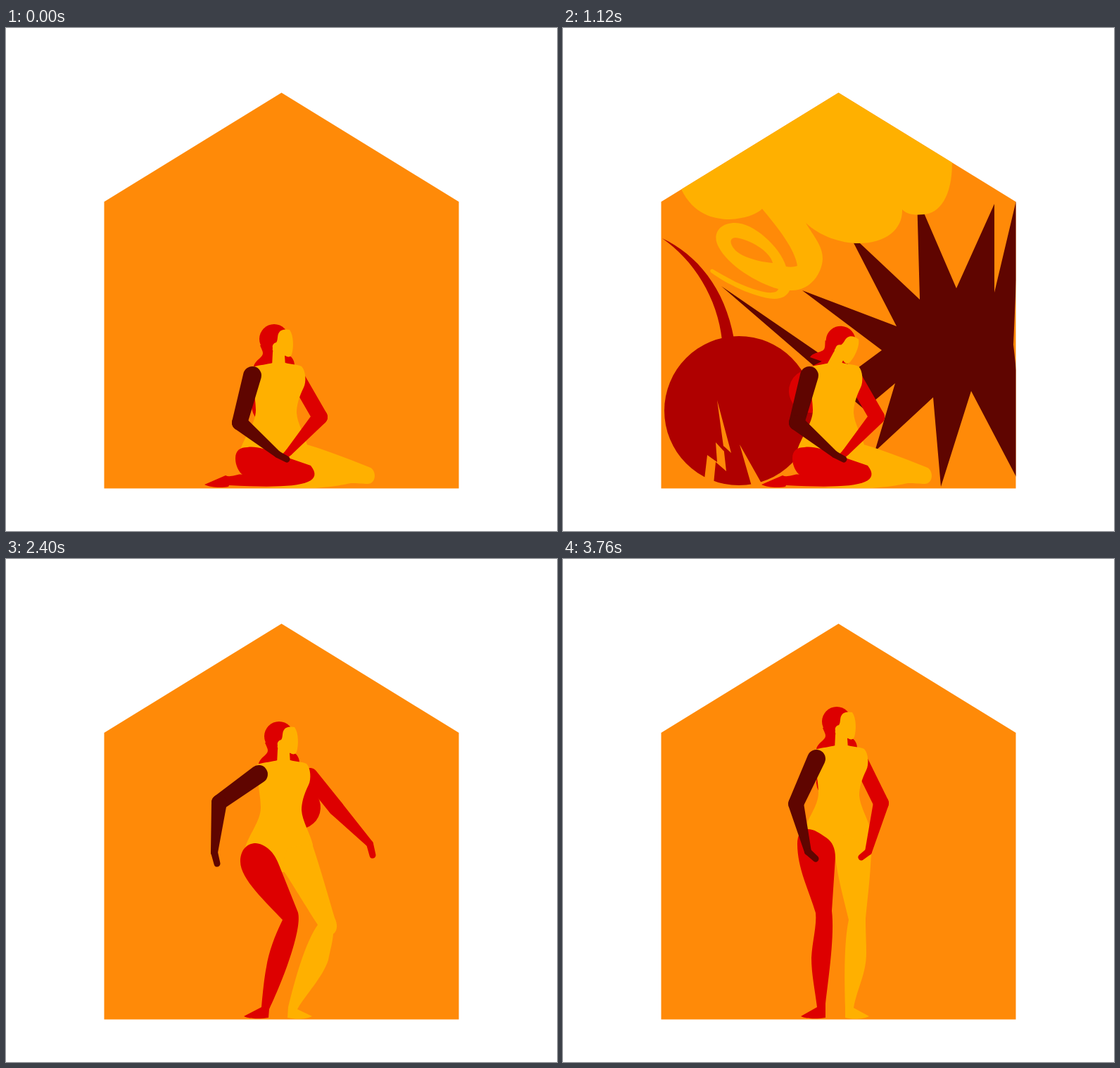
Write an HTML page with a canvas that moves like this. It is 783 px wide and 715 px high and loops after 4.72 s.

```html
<!DOCTYPE html>
<html lang="en">
<head>
<meta charset="utf-8">
<title>House</title>
<style>
  html, body { margin: 0; width: 100%; height: 100%; overflow: hidden; background: #fff; }
  canvas { display: block; }
</style>
</head>
<body>
<canvas id="stage" width="783" height="715"></canvas>
<script>
const ctx = document.getElementById('stage').getContext('2d');
const LOOP = 4720, STEP = 80, LAST = 3760;
const ORANGE = '#ff8a08', YELLOW = '#ffb000', RED = '#dd0000', DARK = '#5f0500', CRIMSON = '#af0000';
const NUMBER = /-?\d+(\.\d+)?/g;

// Smooth interpolation through keys [time, ...values]; slopes vanish at turning points.
function at(keys, t) {
  const last = keys.length - 1;
  if (t <= keys[0][0]) return keys[0].slice(1);
  if (t >= keys[last][0]) return keys[last].slice(1);
  const i = keys.findIndex(k => k[0] > t) - 1;
  const a = keys[i], b = keys[i + 1], span = b[0] - a[0], u = (t - a[0]) / span;
  const rate = (j, c) => (keys[j + 1][c] - keys[j][c]) / (keys[j + 1][0] - keys[j][0]);
  const slope = (j, c) => {
    if (j === 0 || j === last) return 0;
    const p = rate(j - 1, c), q = rate(j, c);
    return p * q <= 0 ? 0 : 2 * p * q / (p + q);
  };
  return a.slice(1).map((v, n) => {
    const c = n + 1, w = 1 - u;
    return v * (1 + 2 * u) * w * w + b[c] * u * u * (3 - 2 * u)
      + span * u * w * (w * slope(i, c) - u * slope(i + 1, c));
  });
}

// Paths with the same commands, blended number by number.
function morph(...keys) {
  const template = keys[0][1];
  const values = keys.map(([t, d]) => [t, ...d.match(NUMBER).map(Number)]);
  return t => {
    const v = at(values, t);
    let i = 0;
    return template.replace(NUMBER, () => v[i++].toFixed(2));
  };
}

function fill(color, d, rule = 'nonzero') {
  ctx.fillStyle = color;
  ctx.fill(new Path2D(d), rule);
}

function capsule(color, x1, y1, r1, x2, y2, r2) {
  const a = Math.atan2(y2 - y1, x2 - x1), d = Math.hypot(x2 - x1, y2 - y1) || 1;
  const o = Math.acos(Math.max(-1, Math.min(1, (r1 - r2) / d)));
  ctx.fillStyle = color;
  ctx.beginPath();
  ctx.arc(x1, y1, r1, a + o, a - o + 2 * Math.PI);
  ctx.arc(x2, y2, r2, a - o, a + o);
  ctx.fill();
}

function disc(color, x, y, r) {
  ctx.fillStyle = color;
  ctx.beginPath();
  ctx.arc(x, y, r, 0, 2 * Math.PI);
  ctx.fill();
}

function group(draw) {
  ctx.save();
  draw();
  ctx.restore();
}

function growFrom(x, y, s) {
  ctx.translate(x, y);
  ctx.scale(s, s);
  ctx.translate(-x, -y);
}

const HOUSE = 'M391.5 92L643.5 247V654.5H139.5V247Z';

// Cloud with its scribble
const cloudShape = morph(
  [640, `M100 -300L168 229L185 230C200 250 225 259 240 258C260 257 275 248 279 232
    C300 260 333 300 338 322C336 332 330 332 320 332C312 300 285 260 255 260C228 260 217 275 222 293
    C228 315 270 345 310 360C306 373 290 375 277 371C255 364 235 355 212 341C208 340 206 344 209 347
    C235 364 270 382 295 383C310 383 318 375 322 362C352 364 371 345 370 322C368 290 345 260 323 226
    C355 262 385 278 410 278C440 278 459 265 460 247C468 258 478 261 488 261C520 260 549 235 551 190L620 -300Z
    M305 330C302 310 280 282 250 279C238 281 244 298 256 306C270 318 290 327 305 330Z`],
  [1120, `M100 -300L160 210L168 229C185 265 215 272 237 272C258 271 275 265 283 257
    C305 283 330 315 333 338C328 340 322 340 317 339C308 310 270 277 245 277C220 277 212 295 221 311
    C235 338 275 362 306 371C304 378 290 377 277 373C255 367 235 356 213 343C209 342 208 346 211 348
    C230 362 270 383 300 385C312 385 319 380 322 373C350 375 368 350 369 328C369 310 357 297 345 277
    C365 296 395 306 420 306C460 306 483 285 482 258C490 266 502 266 512 265C535 264 553 240 553 191L620 -300Z
    M298 334C295 318 265 300 245 298C232 299 240 316 255 323C270 330 285 333 298 334Z`]);
const cloudMove = [[80, 0, 0, 0], [560, 0, 0, .85], [640, 0, 0, 1], [1680, 0, 0, 1], [1920, 50, -62, 1], [2240, 150, -330, 1]];

// Spiky burst
const burstShape = morph(
  [640, `M178 367L390 488L418 455L295 383L441 418L366 287L480 382L483 240L533 376L600 275
    L574 398L640 328L591 453L618 623L544 518L507 654L487 523L413 612L435 505L392 520Z`],
  [1120, `M225 367L407 492L453 458L340 373L474 424L405 290L507 386L503 240L559 370L613 250
    L613 376L650 220L640 450L665 678L580 516L537 652L526 525L443 602L472 505L428 542Z`],
  [1680, `M225 367L407 492L453 458L340 373L474 424L405 290L507 386L503 240L559 370L613 250
    L613 376L650 220L640 450L665 678L580 516L537 652L526 525L443 602L472 505L428 542Z`],
  [1920, `M300 378L502 492L538 458L427 388L559 425L479 306L592 386L572 251L644 370L700 250
    L698 376L735 220L725 450L750 690L665 516L605 645L611 525L499 623L556 506L505 537Z`]);
const burstMove = [[160, 0, 0], [560, 0, .55], [640, 0, 1], [1840, 0, 1], [1920, 0, 1], [2240, 300, 1], [2320, 400, 1]];

// Bomb: x, y, scale, turn
const bombMove = [[80, 384, 440, 0, 0], [640, 194, 424, .483, 0], [1120, 250, 544, 1, 0],
  [1680, 250, 544, 1, 0], [1920, 195, 566, 1, .19], [2240, 0, 580, 1, .3]];
const FUSE = 'M-109 -245C-65 -215 -30 -160 -24 -100L-7 -102C-20 -175 -60 -222 -109 -245Z';
const CRACKS = `M-49 97L-45 63L-31 73L-33 45L-21 58L-31 -15L-11 60L-22 50L-18 86L-33 73L-36 104Z
  M1 48L18 107L32 103Z`;

// Figure
const body = [[0, -8, 211], [1560, -8, 211], [1920, -4, 113], [2400, -1, 21], [2800, 0, 0]];
const tilt = [[80, 0], [640, .38], [1120, .45], [1560, .45], [1920, 0]];
const hair = [[0, 388, 325], [640, 362, 305], [1120, 360, 305], [1560, 362, 305], [1920, 378, 313],
  [2400, 417, 332], [2800, 412, 328], [3280, 400, 325], [3760, 391, 316]];
const TORSO = `M358 271C368 268 380 267 387 265L405 265C412 267 422 267 428 270C434 276 435 292 431 300
  C424 314 421 326 421 336C422 352 433 368 437 385L438 424L387 424L340 392C346 370 363 352 363 332
  C363 315 358 300 358 271Z`;
const NAPE = `M369 240C373 250 376 252 368 259C362 264 360 268 360 271L387 268L388 240Z
  M404 255C412 252 418 260 418 269L400 269Z`;
const FACE = `M411 218C417 226 417 244 414 253C412 258 407 257 404 254L405 270L386 270L387 250
  C388 247 386 247 387 244C386 240 388 237 392 236C395 232 393 226 396 222C399 217 406 217 411 218Z`;

const SIT_NEAR = `M343 596C355 594 370 599 380 603C388 606 396 609 404 612L433 622C455 650 410 655 317 650
  L316 652C305 654 290 653 282 649L312 636C316 638 320 637 325 636C329 635 333 634 336 635
  C331 631 326 622 326 612C326 600 333 596 343 596Z`;
const nearLeg = morph([0, SIT_NEAR], [1560, SIT_NEAR],
  [1920, `M360 499C372 499 385 504 397 508C408 512 420 516 430 519L441 524C455 545 408 600 375 642
    L373 652C362 654 345 654 338 650L366 637C372 622 380 607 388 593C396 578 404 563 410 549
    C370 556 330 548 330 522C330 506 343 499 360 499Z`],
  [2400, `M355 404C364 405 371 409 378 417C383 423 387 432 390 440L414 500C423 518 398 590 374 640
    L373 652C362 654 345 654 338 650L363 637C365 615 367 595 370 580C373 560 382 535 393 513
    C370 488 333 455 333 430C333 414 342 404 355 404Z`],
  [2800, `M345 384C356 383 364 389 374 396C383 402 387 412 387 424L382 500C386 535 378 590 373 632
    L373 652C362 654 345 654 338 650L361 637C358 612 353 590 353 567C354 545 361 520 359 503
    C350 472 333 440 333 405C333 392 338 385 345 384Z`]);

const SIT_FAR = `M380 610C400 630 420 640 430 645C420 648 400 650 390 651L370 653C385 654 420 654 440 654
  L450 653C465 652 480 649 490 647C500 647 507 648 514 648C526 648 527 630 518 625
  C480 610 450 598 420 590L400 590Z`;
const farLeg = morph([0, SIT_FAR], [1560, SIT_FAR],
  [1920, `M400 545C420 555 445 565 467 577C430 597 400 620 385 637L371 652C385 655 398 654 406 651
    L390 643C425 630 452 620 470 610C480 603 486 597 490 592C505 592 512 580 506 572
    C480 545 455 525 430 490L400 500Z`],
  [2400, `M391 440C397 445 402 455 443 520C425 545 410 600 401 637L400 652C412 655 428 654 435 650
    L414 640C425 620 450 595 458 570C461 555 464 545 465 533C472 528 471 518 467 510
    C458 480 447 440 435 405L400 410Z`],
  [2800, `M387 424C390 450 398 480 406 513C399 545 400 600 401 637L401 652C412 655 428 654 435 650
    L413 638C418 610 431 590 431 560C431 545 430 530 430 515C430 512 430 513 430 511
    C433 480 437 450 438 415L400 390Z`]);

// Arms: shoulder, elbow, wrist, fingertips
const nearArm = [[0, 350, 494, 332, 561, 386, 606, 399, 613], [1560, 350, 494, 332, 561, 386, 606, 399, 613],
  [1920, 356, 397, 305, 443, 317, 516, 329, 525], [2400, 359, 306, 303, 346, 296, 417, 300, 433],
  [2800, 360, 284, 306, 322, 305, 390, 310, 406], [3280, 360, 284, 331, 348, 346, 417, 350, 432],
  [3760, 360, 284, 331, 348, 348, 416, 359, 426]];
const farArm = [[0, 412, 494, 446, 553, 402, 603, 397, 608], [1560, 412, 494, 446, 553, 402, 603, 397, 608],
  [1920, 417, 397, 449, 458, 438, 520, 438, 533], [2400, 432, 308, 469, 354, 517, 405, 521, 421],
  [2800, 430, 290, 470, 330, 515, 383, 520, 400], [3280, 421, 284, 452, 347, 437, 417, 432, 428],
  [3760, 421, 284, 452, 347, 434, 416, 424, 424]];

const upperArm = (color, [sx, sy, ex, ey], r) => capsule(color, sx, sy, r, ex, ey, 11);
function forearm(color, [, , ex, ey, wx, wy, hx, hy]) {
  capsule(color, ex, ey, 11, wx, wy, 5);
  capsule(color, wx, wy, 5, hx, hy, 4.5);
}

function drawThoughts(t) {
  group(() => {
    const [x, y, s, turn] = at(bombMove, t);
    ctx.translate(x, y);
    ctx.rotate(turn);
    ctx.scale(s, s);
    fill(CRIMSON, FUSE);
    disc(CRIMSON, 0, 0, 106);
    if (t >= 960) fill(ORANGE, CRACKS);
  });
  group(() => {
    const [x, s] = at(burstMove, t);
    ctx.translate(x, 0);
    growFrom(390, 440, s);
    fill(DARK, burstShape(t));
  });
  group(() => {
    const [x, y, s] = at(cloudMove, t);
    ctx.translate(x, y);
    growFrom(384, 430, s);
    fill(YELLOW, cloudShape(t), 'evenodd');
  });
}

function drawFigure(t) {
  const [x, y] = at(body, t), [turn] = at(tilt, t), [hx, hy] = at(hair, t);
  const near = at(nearArm, t), far = at(farArm, t);
  const onBody = draw => group(() => { ctx.translate(x, y); draw(); });
  const onHead = draw => onBody(() => {
    ctx.translate(390, 262);
    ctx.rotate(turn);
    ctx.translate(-390, -262);
    draw();
  });

  onBody(() => capsule(RED, 388, 268, 10, hx, hy, 31));
  onHead(() => {
    disc(RED, 389, 231, 21);
    fill(RED, NAPE);
  });
  upperArm(RED, far, 11);
  onBody(() => fill(YELLOW, TORSO));
  onHead(() => fill(YELLOW, FACE));
  fill(YELLOW, farLeg(t));
  fill(RED, nearLeg(t));
  forearm(RED, far);
  upperArm(DARK, near, 13);
  forearm(DARK, near);
}

function draw(t) {
  ctx.fillStyle = '#fff';
  ctx.fillRect(0, 0, 783, 715);
  fill(ORANGE, HOUSE);
  if (t > 0 && t < 2320) group(() => {
    ctx.clip(new Path2D(HOUSE));
    drawThoughts(t);
  });
  drawFigure(t);
}

const start = performance.now();
function tick() {
  const t = (performance.now() - start) % LOOP;
  draw(Math.min(LAST, Math.floor(t / STEP) * STEP));
  requestAnimationFrame(tick);
}
tick();
</script>
</body>
</html>
```
